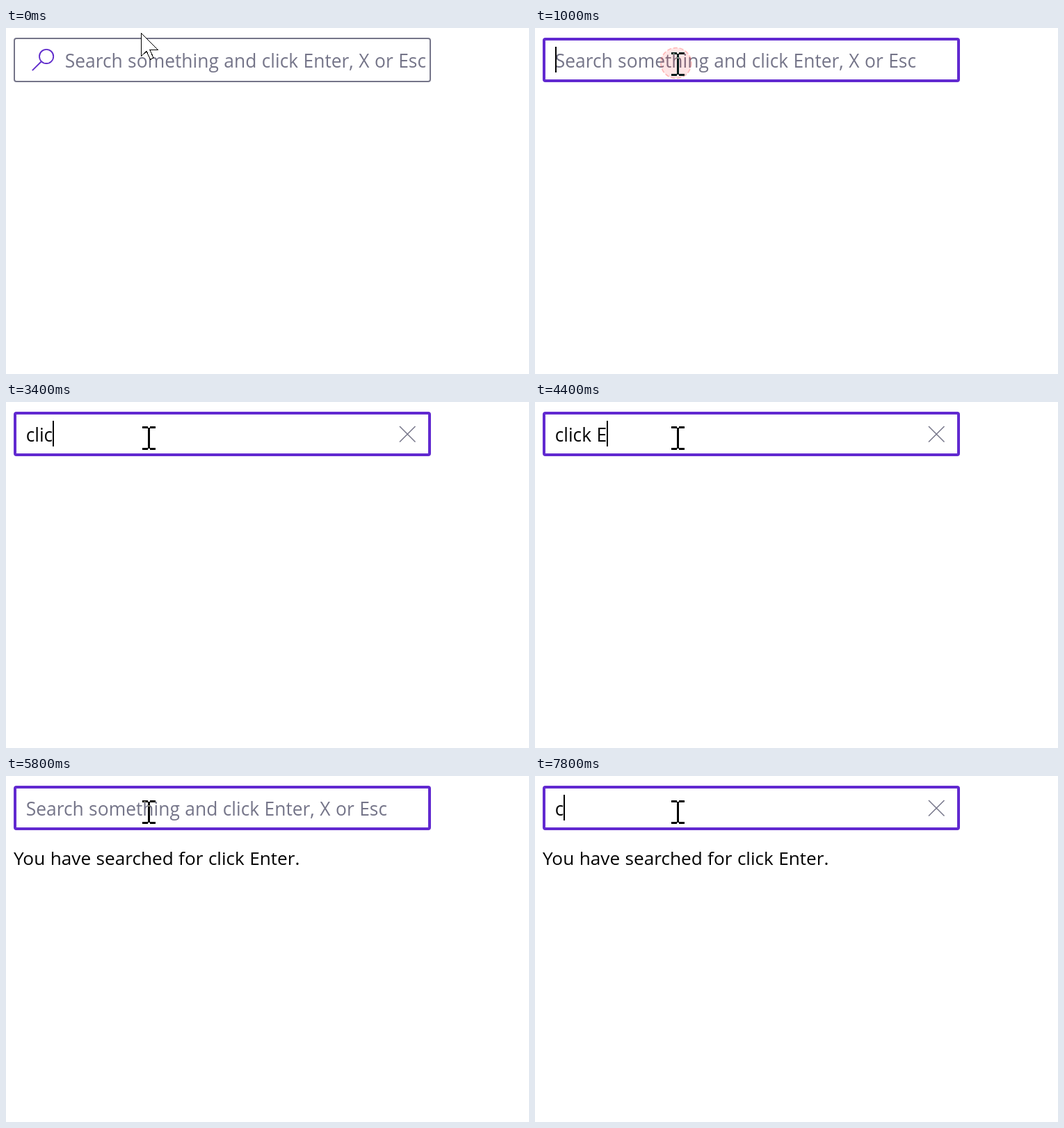
These frames come from a looping animation (752 px wide and 498 px high, 8 s). An HTML page:

```html
<!DOCTYPE html>
<html lang="en">
<head>
<meta charset="utf-8">
<title>Search box</title>
<style>
  html, body { margin: 0; width: 100%; height: 100%; overflow: hidden; background: #fff; }
  svg { display: block; width: 752px; height: 498px; }
  text { font: 26.4px "Open Sans", "Noto Sans", sans-serif; word-spacing: .6px; white-space: pre; }
  #hint { fill: #757589; }
  #result { font-size: 26.2px; }
  #beam { fill: #fff; mix-blend-mode: difference; }
</style>
</head>
<body>
<svg viewBox="0 0 752 498">
  <defs><clipPath id="inner"><rect x="15" y="18" width="589" height="56"/></clipPath></defs>
  <rect width="752" height="498" fill="#fff"/>
  <rect id="box" fill="none"/>
  <g id="lens" fill="none" stroke="#5f2bcb" stroke-width="1.8">
    <circle cx="58.1" cy="40.9" r="10.1"/>
    <path d="M50.5 48.5 37.8 61.2"/>
  </g>
  <g clip-path="url(#inner)">
    <text id="hint" y="57">Search something and click Enter, X or Esc</text>
    <text id="typed" x="28.7" y="57"></text>
  </g>
  <path id="clear" d="M566 35 588.5 57.5M588.5 35 566 57.5" stroke="#757589" stroke-width="1.5"/>
  <rect id="caret" y="27" width="2" height="37"/>
  <text id="result" x="11" y="128">You have searched for click Enter.</text>
  <circle id="press" cx="202.8" cy="50.5" r="22" fill="#f00" fill-opacity=".1"
    stroke="#f33" stroke-opacity=".3" stroke-width="1.6" stroke-dasharray="6 3"/>
  <path id="beam" d="M0 0H8V2H11V0H19V3H11V31H19V34H11V32H8V34H0V31H8V3H0Z"/>
  <path id="arrow" d="M194.5 7.5V40.5L202 33.5 207.5 45 212 43 207 31.5H218.5Z"
    fill="#fff" stroke="#000" shape-rendering="crispEdges"/>
</svg>
<script>
const LOOP = 8000;
const STEP = 200;   // the screen refreshes at this interval
const BLINK = 530;  // caret half period
const TEXT_X = 28.7;
const PHRASE = "click Enter";

const HOVER = 200, FOCUS = 800, OPEN = 1000, ENTER = 5750, RETYPE = 7750;
const CARET_START = 870;
// When each letter of PHRASE is typed
const KEYS = [2150, 2410, 2450, 3300, 3500, 3650, 4300, 4700, 4900, 5050, 5100];

const $ = id => document.getElementById(id);
const set = (id, attrs) => {
  for (const k in attrs) $(id).setAttribute(k, attrs[k]);
};
const show = (id, on) => set(id, { visibility: on ? "visible" : "hidden" });

function drawBox(t) {
  const focus = t >= FOCUS;
  const line = focus ? 4 : 2;
  set("box", {
    x: 11 + line / 2, y: 14 + line / 2,
    width: 600 - line, height: 64 - line,
    rx: focus ? 2 : 3,
    "stroke-width": line,
    stroke: focus ? "#6129d0" : t >= HOVER ? "#2f2a3d" : "#757589"
  });
}

function drawCaret(t) {
  // Every key restarts the blink
  const from = [CARET_START, ...KEYS, RETYPE].filter(k => k <= t).pop();
  show("caret", t >= CARET_START && Math.floor((t - from) / BLINK) % 2 === 0);
  set("caret", { x: Math.round(TEXT_X + $("typed").getComputedTextLength()) });
}

function render(time) {
  const t = Math.floor(time / STEP) * STEP;
  const open = t >= OPEN;
  const count = t >= ENTER ? Number(t >= RETYPE) : KEYS.filter(k => k <= t).length;

  drawBox(t);
  show("lens", !open);
  set("hint", { x: open ? TEXT_X : TEXT_X + 56 });
  show("hint", !count);
  $("typed").textContent = PHRASE.slice(0, count);
  show("clear", count);
  drawCaret(t);
  show("result", t >= ENTER);

  show("arrow", t < HOVER);
  show("beam", t >= HOVER);
  set("beam", { transform: t < HOVER + STEP ? "translate(214 32)" : "translate(196 35)" });
  show("press", open && t < OPEN + STEP);
}

const start = performance.now();
function tick() {
  render((performance.now() - start) % LOOP);
  requestAnimationFrame(tick);
}
tick();
</script>
</body>
</html>
```
